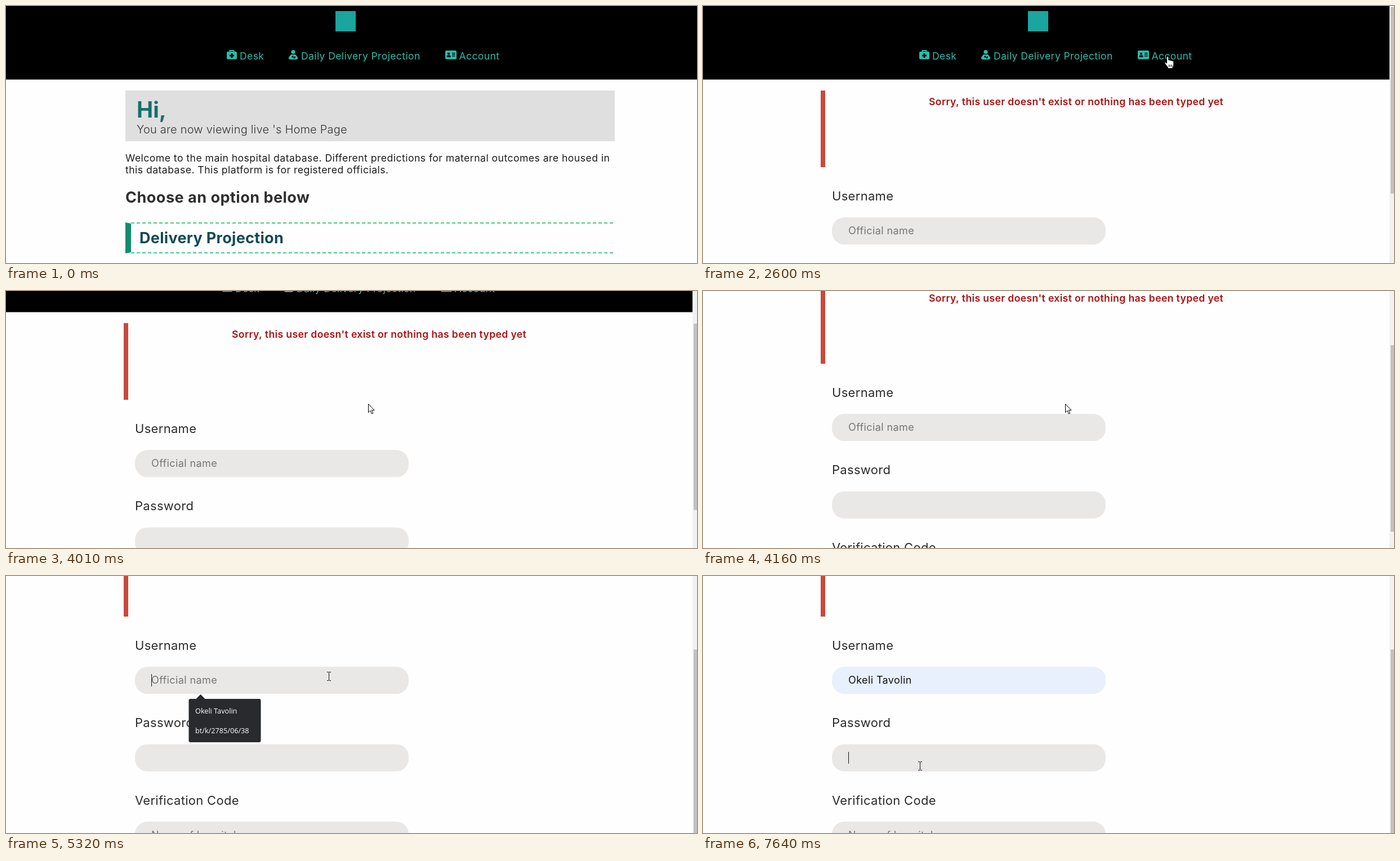
Write an HTML page with a canvas that moves like this. It is 1227x456 px and loops after 7.99 s.

```html
<!DOCTYPE html>
<html lang="en">
<head>
<meta charset="utf-8">
<title>Hospital portal</title>
<style>
  html, body { margin: 0; width: 100%; height: 100%; overflow: hidden; background: #fefefe; }
  canvas { display: block; }
</style>
</head>
<body>
<canvas id="stage" width="1227" height="456"></canvas>
<script>
const ctx = document.getElementById('stage').getContext('2d');
const LOOP = 7990, W = 1227, H = 456;
const SANS = 'Inter, "Open Sans", sans-serif';
const USER = 'Okeli Tavolin', USER_ID = 'bt/k/2785/06/38';
const TEAL = '#2bbcab', FIELD = '#eae8e7';

const T = { page: 2600, scroll: 3850, scrollEnd: 4540, open: 5090, pick: 6650, password: 7410 };

// Pointer moves: start, end, steps, target x, target y
const START = [1096.5, 397.5];
const MOVES = [
  [290, 450, 3, 951, 243],
  [750, 1530, 11, 824, 89],
  [3470, 3620, 3, 643, 200],
  [4710, 4860, 3, 571, 177],
  [5870, 6170, 5, 364, 242],
  [6950, 7260, 5, 382.5, 336]
];
const CLICKS = [1760, 5090, 6420, 7410];
const CARETS = [[5090, 5640], [6150, 6650]];

const between = (v, a, b) => v >= a && v < b;

function text(str, x, y, size, color, weight = 400, spacing = 0, family = SANS) {
  ctx.font = `${weight} ${size}px ${family}`;
  ctx.letterSpacing = spacing + 'px';
  ctx.fillStyle = color;
  ctx.fillText(str, x, y);
}

function rect(x, y, w, h, color) {
  ctx.fillStyle = color;
  ctx.fillRect(x, y, w, h);
}

function round(x, y, w, h, r, color) {
  ctx.fillStyle = color;
  ctx.beginPath();
  ctx.roundRect(x, y, w, h, r);
  ctx.fill();
}

function disc(x, y, r, color) {
  ctx.fillStyle = color;
  ctx.beginPath();
  ctx.arc(x, y, r, 0, 7);
  ctx.fill();
}

function shape(d, fill, stroke) {
  const p = new Path2D(d);
  ctx.fillStyle = fill;
  ctx.fill(p);
  if (stroke) {
    ctx.strokeStyle = stroke;
    ctx.lineWidth = 1;
    ctx.lineJoin = 'round';
    ctx.stroke(p);
  }
}

function at(x, y, draw) {
  ctx.save();
  ctx.translate(x, y);
  draw();
  ctx.restore();
}

function header(width) {
  rect(0, 0, width, 130.5, '#000');
  at(width < W ? -8 : 0, 0, () => {
    rect(585, 9, 36, 36, '#1aa59f');

    // First aid kit
    round(392, 81, 18, 13.5, 2, TEAL);
    ctx.strokeStyle = TEAL;
    ctx.lineWidth = 2;
    ctx.strokeRect(397.5, 79, 7, 4);
    rect(399.6, 84, 2.8, 8, '#000');
    rect(397, 86.6, 8, 2.8, '#000');

    // Parent and child
    disc(510, 81.5, 3.6, TEAL);
    shape('M506 86H514L518 91Q519 95 514 95H506Q501 95 502 91Z', TEAL);
    disc(509, 90, 1.7, '#000');
    shape('M510 92L513 89L514.5 91L512 93.5Z', '#000');

    // Identity card
    round(780, 79, 20, 15.5, 2, TEAL);
    disc(786, 84.7, 2.1, '#000');
    round(782.6, 87.6, 7, 3.4, 1.6, '#000');
    for (const y of [83, 85.7, 88.4]) rect(792, y, 5.5, 1.2, '#000');

    text('Desk', 415, 95, 17.6, TEAL, 400, .36);
    text('Daily Delivery Projection', 524, 95, 17.6, TEAL, 400, .36);
    text('Account', 804.5, 95, 17.6, TEAL, 400, .36);
  });
}

function homePage() {
  header(W);
  rect(212, 150, 869, 90, '#dfdfdf');
  text('Hi,', 232, 198, 39, '#176f6a', 700);
  text("You are now viewing live 's Home Page", 232, 225.5, 20, '#333', 300, .2);
  text('Welcome to the main hospital database. Different predictions for maternal outcomes are housed in',
    212, 276, 17.6, '#1d1d1d', 400, .46);
  text('this database. This platform is for registered officials.', 212, 297, 17.6, '#1d1d1d', 400, .46);
  text('Choose an option below', 212, 348.5, 27, '#2f2f2f', 700, .5);

  ctx.strokeStyle = '#4bc68b';
  ctx.lineWidth = 2;
  ctx.setLineDash([6, 4]);
  ctx.beginPath();
  for (const y of [385, 438]) {
    ctx.moveTo(222, y);
    ctx.lineTo(1081, y);
  }
  ctx.stroke();
  ctx.setLineDash([]);
  shape('M212 384L222 386V437L212 439Z', '#0f8d6c');
  text('Delivery Projection', 237, 421, 27, '#144a54', 700, .3);
}

function field(label, hint, y, color = FIELD) {
  text(label, 229, y - 30, 22, '#2b2b2b', 400, .3);
  round(229, y, 486, 48.3, 22, color);
  text(hint, 258, y + 30, 18, '#757575', 400, .4);
}

function loginPage(t, scroll) {
  const preview = between(t, 6095, T.pick), filled = t >= T.pick;
  at(0, -scroll, () => {
    header(1219);
    rect(209, 150, 8, 136, '#c8493b');
    text("Sorry, this user doesn't exist or nothing has been typed yet", 401, 176, 17.6, '#ab1212', 600, .36);
    field('Username', preview || filled ? '' : 'Official name', 375, preview || filled ? '#e8f0fe' : FIELD);
    field('Password', '', 512.4);
    field('Verification Code', 'Name of hospital', 649.8);
    if (preview) text(USER, 258, 405, 13.33, '#111', 400, 0, '"Liberation Sans", Arial, sans-serif');
    if (filled) {
      text(USER, 258, 405, 18, '#111', 400, .4);
      if (t < 7180) rect(259 + ctx.measureText(USER).width, 388, 1, 22, '#111');
    }
    if (CARETS.some(c => between(t, ...c))) rect(258, 388, 1, 22, '#111');
    if (t >= T.password) rect(258, 526, 1, 21, '#111');
  });

  rect(1219, 0, 8, H, '#f1f1f1');
  rect(1221, 2 + scroll * .6, 6, 331, '#c1c1c1');

  if (between(t, T.open, T.pick)) suggestions(preview);
}

function suggestions(active) {
  const font = '"Open Sans", sans-serif';
  shape('M337 218.5L345.5 210L354 218.5Z', '#292a2d');
  round(324.5, 218, 128, 77, 3, '#292a2d');
  if (active) rect(325, 221, 127, 35.5, '#3f4042');
  text(USER, 336, 244, 12.7, '#fff', 400, 0, font);
  text(USER_ID, 336, 279, 12.7, '#fff', 400, 0, font);
}

function pointer(t) {
  let [x, y] = START;
  MOVES.forEach(([from, to, steps, tx, ty], i) => {
    if (t < from) return;
    const step = Math.floor((t - from) / (to - from) * (steps - 1) + 1e-6) + 1;
    let p = Math.min(1, step / steps);
    if (i) p = p * p * (3 - 2 * p);
    x += (tx - x) * p;
    y += (ty - y) * p;
  });
  return [x, y];
}

const drawArrow = () =>
  shape('M.5 .5V15.5L4 12.3L6.4 18L8.7 17L6.3 11.4H11Z', '#fff', '#000');

function drawHand() {
  shape('M-.5 1.5Q1 -.5 2.5 1.5V7Q4 6 5.5 7.5Q7 6.8 8.4 8.3Q11.5 7.6 11.8 10.5V15Q11.5 18 10 19.5V21.8H1.5V20' +
    'L-3.5 13.5Q-5 11 -3 10.6L-.5 12.6Z', '#fff', '#000');
  rect(3, 15, 1, 4, '#000');
  rect(5.5, 15, 1, 4, '#000');
  rect(8, 15, 1, 4, '#000');
}

function drawBeam() {
  rect(2, -6, 1, 14, '#111');
  for (const y of [-7, 8]) {
    rect(-1, y, 3, 1, '#111');
    rect(3, y, 3, 1, '#111');
  }
}

function cursorFor(x, y, t) {
  if (t < T.scroll) return between(x, 772, 878) && between(y, 76, 101) ? drawHand : drawArrow;
  if (t < T.scrollEnd) return drawArrow;
  const overField = between(x, 229, 715) && (between(y, 161, 209) || between(y, 298, 347));
  return overField ? drawBeam : drawArrow;
}

function render(t) {
  rect(0, 0, W, H, '#fefefe');
  if (t < T.page) homePage();
  else {
    const p = Math.min(1, Math.max(0, (t - T.scroll) / (T.scrollEnd - T.scroll)));
    const scroll = t < 3930 ? 0 : Math.round(214 * (1 - (1 - p) ** 2.22));
    loginPage(t, scroll);
  }
  if (t < MOVES[0][0]) return;
  const [x, y] = pointer(t);
  at(Math.round(x), Math.round(y), cursorFor(x, y, t));
  if (CLICKS.some(c => between(t, c, c + 230))) disc(x, y, 11.7, 'rgba(255,235,0,.6)');
}

const begin = performance.now();
function frame() {
  const t = (performance.now() - begin) % LOOP;
  // The screen refreshes in coarse ticks while scrolling
  const ticking = between(t, 3930, 4540);
  render(ticking ? 3930 + Math.floor((t - 3930) / 76.25) * 76.25 : t);
  requestAnimationFrame(frame);
}
frame();
</script>
</body>
</html>
```
